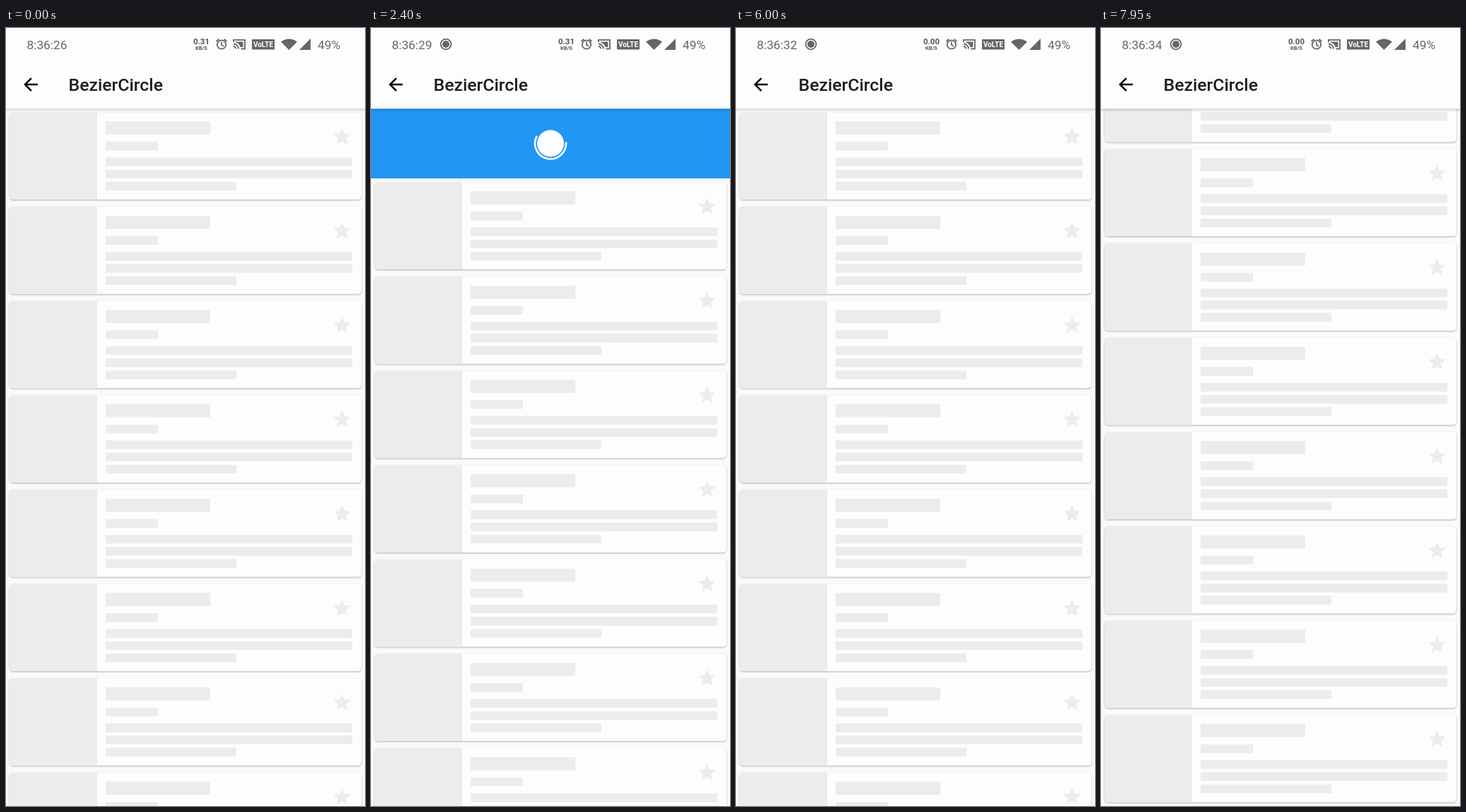
An HTML page for the animation above (8000 ms loop, 508 by 1102 pixels).

```html
<!DOCTYPE html>
<html lang="en">
<head>
<meta charset="utf-8">
<title>BezierCircle</title>
<style>
  html, body { margin: 0; width: 100%; height: 100%; overflow: hidden; background: #fafaf9; }
  svg { display: block; width: 508px; height: 1102px; font-family: Roboto, sans-serif; }
  .card { fill: #fdfdfc; filter: drop-shadow(0 1.3px .8px rgba(0, 0, 30, .3)); }
  .shade { fill: #ececea; }
  .bar { fill: #fdfdfc; filter: drop-shadow(0 1px 2px rgba(0, 0, 40, .25)); }
  .icon { fill: #666; }
  .line { fill: none; stroke: #666; stroke-width: 1.8; }
  .status { fill: #666; font-size: 17.3px; }
  .tiny { fill: #555; font-weight: 700; text-anchor: middle; }
  .title { fill: #1c1c1c; font-size: 24.8px; font-weight: 500; }
</style>
</head>
<body>
<svg viewBox="0 0 508 1102">
  <defs>
    <clipPath id="pulled"><rect id="pulledBox" y="114" width="508" height="0"/></clipPath>
    <g id="item">
      <rect class="card" x="5" y="4.9" width="498" height="123.7" rx="5"/>
      <path class="shade" d="M129 4.9V128.6H9.5Q5 128.6 5 124V9.5Q5 4.9 9.5 4.9Z"/>
      <path class="shade" d="M141 17.8h148v18.5h-148zM141 46.6h74v12.3h-74zM141 69h349v12.3h-349zM141 86.2h349v12.3h-349zM141 103.4h185v12.3h-185z"/>
      <path class="shade" transform="translate(460.7 24.3) scale(1.235)"
        d="M12 17.27 18.18 21l-1.64-7.03L22 9.24l-7.19-.61L12 2 9.19 8.63 2 9.24l5.46 4.73L5.82 21z"/>
    </g>
  </defs>

  <rect width="508" height="1102" fill="#fafaf9"/>
  <g id="list"></g>
  <g clip-path="url(#pulled)">
    <path id="wave" fill="#2196f3"/>
    <g fill="#fefefe">
      <path id="neck"/>
      <circle id="ball" cx="254" r="19"/>
    </g>
    <path id="arc" fill="none" stroke="#fefefe" stroke-width="2.6"/>
  </g>

  <rect class="bar" x="-8" y="-8" width="524" height="122.3"/>
  <text id="clock" class="status" x="29.5" y="29.5"></text>
  <g id="record">
    <circle class="line" cx="106" cy="23" r="7.4"/>
    <circle class="icon" cx="106" cy="23" r="5"/>
  </g>
  <text id="speed" class="tiny" x="276.5" y="22.5" font-size="11.5"></text>
  <text class="tiny" x="276.5" y="31" font-size="7.5">KB/S</text>
  <g class="line">
    <circle cx="305" cy="23.5" r="6.2"/>
    <path d="M305 19.5v4.5l3 2M297.5 19l4-3.3M312.5 19l-4-3.3"/>
    <path d="M322 20v-3.2h16V29.5h-5.5M322 22.5a7 7 0 0 1 7 7M322 26a3.5 3.5 0 0 1 3.5 3.5"/>
  </g>
  <path class="icon" d="M325 19.500H335.500V27H331.500Q330 21.500 325 20.500Z"/>
  <rect class="icon" x="348" y="16" width="32" height="14.5" rx="1"/>
  <text x="364" y="26.8" font-size="10" font-weight="700" text-anchor="middle" fill="#fefefe">VoLTE</text>
  <path class="icon" d="M389 19.5Q400.5 11.5 412 19.5L400.5 31ZM431 15V31H415Z"/>
  <text class="status" x="441" y="29.5">49%</text>
  <path transform="translate(20.2 65.2) scale(1.235)"
    d="M20 11H7.83l5.59-5.59L12 4l-8 8 8 8 1.41-1.41L7.83 13H20z"/>
  <text class="title" x="88.5" y="88.7">BezierCircle</text>
</svg>
<script>
const LOOP = 8000, STEP = 50;
const TOP = 114, REST = 99, PEAK = 174, ROW = 133.6, ROWS = 20;
const SCROLL_END = ROWS * ROW - 987.2;
const RELEASE = 1450, CX = 254, CY = 163.5;
const $ = id => document.getElementById(id);
const part = (t, from, to) => Math.min(1, Math.max(0, (t - from) / (to - from)));
const easeOut = u => 1 - (1 - u) ** 2;
const smooth = u => u * u * (3 - 2 * u);

$('list').innerHTML = Array.from({ length: ROWS }, (_, i) =>
  `<use href="#item" y="${i * ROW}"/>`).join('');

// Overdamped return from 1 to 0, time in ms.
function spring(ms) {
  const s = ms / 1000;
  return (22 * Math.exp(-9.08 * s) - 9.08 * Math.exp(-22 * s)) / 12.92;
}

function pull(t) {
  if (t < RELEASE) return PEAK * Math.sin(part(t, 150, 1400) * Math.PI / 2);
  if (t < 4250) return REST + (PEAK - REST) * spring(t - RELEASE);
  const x = (t - 4250) * 0.00625;
  return t < 5200 ? REST * (1 + x) * Math.exp(-x) : 0;
}

const swing = [[1450, 60], [1600, 50], [1850, 0], [2000, -22], [2150, 0], [2250, -8], [2350, 0]];
function bulge(t, height) {
  if (t < RELEASE) return Math.max(0, height - REST) * 0.8;
  const i = swing.findIndex(([time]) => time > t);
  if (i < 1) return 0;
  const [t0, a] = swing[i - 1], [t1, b] = swing[i];
  return a + (b - a) * part(t, t0, t1);
}

function scroll(t) {
  const joint = 36 + 4 * ROW;
  if (t < 7050) return joint * part(t, 6400, 7050) ** 1.5;
  return joint + (SCROLL_END - joint) * (1 - (1 - part(t, 7050, 7900)) ** 1.3);
}

function drawBall(t) {
  const rise = easeOut(part(t, 1900, 2300)) * (1 - smooth(part(t, 3550, 4050)));
  const base = TOP + REST, cy = base + 24 + (CY - base - 24) * rise;
  $('ball').setAttribute('cy', cy);
  $('ball').style.display = rise > 0 ? '' : 'none';
  const w = 19 + 30 * (1 - rise), y = cy + 8;
  $('neck').setAttribute('d', rise > 0 && rise < 0.7
    ? `M${CX - w} ${base}Q${CX - 12} ${base} ${CX - 17} ${y}H${CX + 17}Q${CX + 12} ${base} ${CX + w} ${base}Z` : '');
}

function drawArc(t) {
  if (t < 2300 || t >= 3450) return $('arc').setAttribute('d', '');
  const start = -5 + (t - 2400) * 0.36;
  const sweep = 124 + 90 * Math.cos((t - 2400) / 400);
  const at = deg => {
    const a = deg * Math.PI / 180;
    return `${CX + 22 * Math.cos(a)} ${CY + 22 * Math.sin(a)}`;
  };
  $('arc').setAttribute('d', `M${at(start)}A22 22 0 ${sweep > 180 ? 1 : 0} 1 ${at(start + sweep)}`);
}

function draw(t) {
  const height = pull(t), base = TOP + Math.min(height, REST);
  $('list').setAttribute('transform', `translate(0 ${TOP + 0.5 + height - scroll(t)})`);
  $('pulledBox').setAttribute('height', height);
  $('wave').setAttribute('d', `M0 ${TOP}H508V${base}Q${CX} ${base + 2 * bulge(t, height)} 0 ${base}Z`);
  drawBall(t);
  drawArc(t);
  $('clock').textContent = '8:36:' + (26 + Math.floor((t + 700) / 1000));
  $('record').style.display = t < 300 ? 'none' : '';
  $('speed').textContent = t < 3000 ? '0.31' : t < 6000 ? '0.07' : '0.00';
}

const begin = performance.now();
function tick() {
  const t = (performance.now() - begin) % LOOP;
  draw(Math.floor(t / STEP) * STEP);
  requestAnimationFrame(tick);
}
tick();
</script>
</body>
</html>
```
